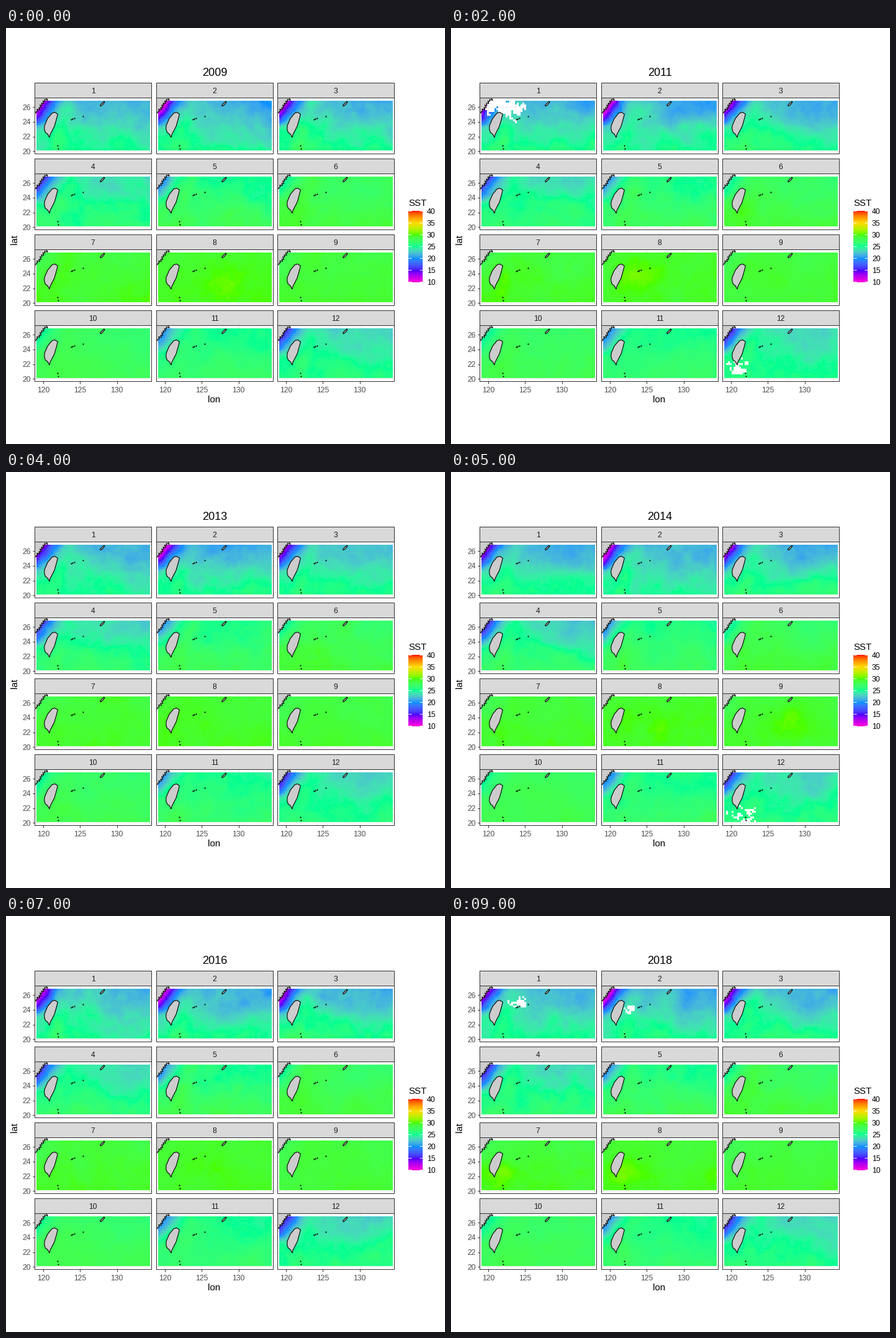
Animation, 707 px wide and 669 px high, one loop 10 s. Source, as a matplotlib script:

```python
import numpy as np
import matplotlib.pyplot as plt
from matplotlib.animation import FuncAnimation
from matplotlib.patches import Rectangle, Polygon

W, H, DPI = 707, 669, 100
PX = 72 / DPI
YEARS = range(2009, 2019)
COLS, ROWS = (46, 242, 437), (88, 210, 332, 454)
PW, STRIP, PH = 188, 24, 90
NX, NY = 61, 27
DEG = 11.86

plt.rcParams["font.family"] = "Liberation Sans"


# ---- colour scale: seven rainbow stops blended in CIELAB ----
M = np.array([[.4124, .3576, .1805], [.2126, .7152, .0722], [.0193, .1192, .9505]])
WHITE = M.sum(axis=1)


def to_lab(rgb):
    lin = np.where(rgb <= .04045, rgb / 12.92, ((rgb + .055) / 1.055) ** 2.4)
    t = lin @ M.T / WHITE
    f = np.where(t > .008856, np.cbrt(t), 7.787 * t + 16 / 116)
    return np.stack([116 * f[:, 1] - 16, 500 * (f[:, 0] - f[:, 1]),
                     200 * (f[:, 1] - f[:, 2])], axis=1)


def to_rgb(lab):
    fy = (lab[:, 0] + 16) / 116
    f = np.stack([fy + lab[:, 1] / 500, fy, fy - lab[:, 2] / 200], axis=1)
    xyz = np.where(f > .2069, f ** 3, (f - 16 / 116) / 7.787) * WHITE
    lin = np.clip(xyz @ np.linalg.inv(M).T, 0, 1)
    return np.clip(np.where(lin <= .0031308, 12.92 * lin,
                            1.055 * lin ** (1 / 2.4) - .055), 0, 1)


STOPS = ["#FF00DB", "#4900FF", "#0092FF", "#00FF92", "#49FF00", "#FFDB00", "#FF0000"]
stops = to_lab(np.array([[int(c[i:i + 2], 16) / 255 for i in (1, 3, 5)] for c in STOPS]))
pos = np.linspace(0, 6, 601)
LUT = to_rgb(np.stack([np.interp(pos, range(7), stops[:, k]) for k in range(3)], axis=1))

# ---- sea surface ----
# yearly heat wave: month, lon, lat, radius, degrees
HEAT = {2009: (8, 129, 23, 6, .6), 2011: (8, 123.8, 23.5, 3, 1.3),
        2012: (7, 127.5, 24, 3, .9), 2014: (9, 127.5, 23.3, 4.5, 1.5),
        2015: (7, 124.5, 23.3, 3, 1.5), 2017: (8.3, 128.5, 23, 8, 1.5),
        2018: (7.5, 122, 22.5, 2.5, 1.6)}
# clouded spots: year, month, lon, lat, radius
CLOUDED = [(2011, 1, 122.6, 25.8, 2.8), (2011, 12, 121, 21.8, 1.6),
           (2012, 1, 120, 25.6, 1.6), (2012, 2, 121, 25.8, 1.8),
           (2014, 12, 121.8, 21, 2.2), (2015, 12, 122, 26.4, .8),
           (2017, 11, 123.3, 26, .9), (2017, 12, 122.5, 25.8, .9),
           (2018, 1, 124, 25, 1.3), (2018, 2, 122.6, 24, .8)]

xs = 49 + (np.arange(NX) + .5) * 182.5 / NX
ys = 117.5 + (np.arange(NY) + .5) * 80 / NY
LON, LAT = np.meshgrid(120 + (xs - 60) / DEG, 20 + (198.3 - ys) / DEG)


def bump(x, y, rx, ry):
    return np.exp(-((LON - x) / rx) ** 2 - ((LAT - y) / ry) ** 2)


def season(month, mean, swing, peak):
    return mean + swing * np.cos((month - peak) * np.pi / 6)


def cloud(rng, power):
    """Smooth random field with unit spread."""
    n = 96
    f = np.fft.fftfreq(n) * n
    k = np.hypot(*np.meshgrid(f, f)) + 1.5
    z = np.fft.ifft2(np.fft.fft2(rng.normal(size=(n, n))) * k ** -power).real
    z = z[:NY, :NX]
    return (z - z.mean()) / z.std()


def sea(year, month):
    """RGBA picture of one month's surface temperature."""
    rng = np.random.default_rng(year * 100 + month)
    south = season(month, 27.4, 2.2, 7.6)
    north = season(month, 25, 4.1, 8)
    coast = season(month, 20.2, 8.9, 8)
    gap = south - north

    rise = np.clip((LAT - 20) / 6.8 + .07 * cloud(rng, 2), 0, 1.1)
    t = south - gap * rise * (.62 + .38 * (LON - 119) / 15.4)
    t += .25 * gap * np.exp(-((LON - 122.4 - .3 * (LAT - 23)) / 1.1) ** 2)
    t -= .15 * gap * bump(130, 24.8, 4, 1.5)
    t += (.15 + .06 * gap) * cloud(rng, 1.9) + .1 * cloud(rng, .9)
    if year in HEAT:
        m, x, y, r, dt = HEAT[year]
        t += dt * np.exp(-(month - m) ** 2) * bump(x, y, r, .65 * r)

    # cold water hugging the mainland
    off = (LON - 119.5) * .839 - (LAT - 26) * .545 + .12 * cloud(rng, 1.8)
    pull = np.exp(-(np.maximum(off, 0) / 1.4) ** 1.6) / (1 + np.exp((23.6 - LAT) / .4))
    t += (np.minimum(coast, t) - t) * pull

    img = np.dstack([LUT[np.clip((t - 10) * 20, 0, 600).astype(int)],
                     np.ones((NY, NX))])
    for y0, m, x, y, r in CLOUDED:
        if (y0, m) == (year, month):
            img[bump(x, y, r, .7 * r) * (1 + .8 * cloud(rng, .8)) > .65, 3] = 0
    return img


# ---- stage ----
fig = plt.figure(figsize=(W / DPI, H / DPI), dpi=DPI, facecolor="white")
ax = fig.add_axes([0, 0, 1, 1])


def text(x, y, s, size, color="black", ha="center", **kw):
    return ax.text(x, y, s, fontsize=size * PX, color=color, ha=ha,
                   va=kw.pop("va", "baseline"), zorder=9, **kw)


def line(x, y, color, lw=1., z=1):
    ax.plot(x, y, color=color, lw=lw * PX, zorder=z, solid_capstyle="butt")


def box(x, y, h, fill):
    patch = Rectangle((x, y), PW, h, fc=fill, ec="#333333", lw=PX, zorder=6)
    return ax.add_patch(patch)


def land(pts, x, y, clip):
    patch = Polygon(np.array(pts) + (x, y), fc="#CCCCCC", ec="black",
                    lw=1.1 * PX, zorder=4)
    ax.add_patch(patch)
    patch.set_clip_path(clip)


def rugged_coast():
    """Jagged shore running from the panel's top down to its left side."""
    rng = np.random.default_rng(4)
    s = np.linspace(0, 1, 20)
    jag = 2.2 * (-1) ** np.arange(20) + rng.normal(0, .8, 20)
    shore = np.stack([21 - 23 * s + .8 * jag, -1 + 30 * s + .6 * jag], axis=1)
    return [(-5, -5), (23, -5), *shore, (-5, 29)]


# outlines in pixels from a panel's corner
TAIWAN = [(32.5, 23.5), (37.3, 26.5), (35, 35.5), (32, 46), (25, 59.5), (24, 64),
          (21, 58.5), (17.5, 56), (15.8, 51), (16, 45), (21, 33.5), (28, 25)]
OKINAWA = [(105.5, 12.5), (107.5, 10), (112, 6), (113, 7), (110, 11), (106.5, 13.8)]
ISLETS = [(59, 34.5), (61, 34.3), (64, 33), (77.5, 30), (36.5, 77), (37.5, 81.5)]
MAINLAND = rugged_coast()

images = []
for k in range(12):
    x, y = COLS[k % 3], ROWS[k // 3]
    top = y + STRIP
    box(x, y, STRIP, "#D9D9D9")
    frame = box(x, top, PH, "none")
    text(x + PW / 2, y + 17, str(k + 1), 12, "#1A1A1A")
    for i in range(6):
        gx = x + 14 + 2.5 * i * DEG
        line([gx, gx], [top, top + PH], "#EBEBEB", .5 if i % 2 else 1)
    for i in range(8):
        gy = top + 86.3 - i * DEG
        line([x, x + PW], [gy, gy], "#EBEBEB", .5 if i % 2 else 1)
    images.append(ax.imshow(sea(YEARS[0], k + 1), aspect="auto", interpolation="nearest",
                            extent=(x + 3, x + 185.5, top + 85.5, top + 5.5), zorder=3))
    for pts in (TAIWAN, MAINLAND, OKINAWA):
        land(pts, x, top, frame)
    for dx, dy in ISLETS:
        ax.plot(x + dx, top + dy, "o", color="black", ms=2.2 * PX, mew=0, zorder=4)
    if k % 3 == 0:
        for lat in (20, 22, 24, 26):
            ty = top + 86.3 - (lat - 20) * DEG
            line([x - 3, x], [ty, ty], "#333333")
            text(x - 6, ty + 4.5, str(lat), 12.3, "#4D4D4D", "right")
    if k >= 9:
        for lon in (120, 125, 130):
            tx = x + 14 + (lon - 120) * DEG
            line([tx, tx], [top + PH, top + PH + 4], "#333333")
            text(tx, 585.5, str(lon), 12.3, "#4D4D4D")

title = text(336, 77.4, "", 18)
text(335, 602.4, "lon", 15)
text(14, 340, "lat", 15, rotation=90, va="center")
text(648, 285.5, "SST", 15, ha="left")
ax.imshow(LUT[::-1, None], extent=(648, 671, 409, 294), aspect="auto", zorder=3)
for i in range(7):
    ly = 408.4 - i * 19
    line([648, 652.6], [ly, ly], "white", 1, 5)
    line([666.4, 671], [ly, ly], "white", 1, 5)
    text(678, ly + 4.8, str(10 + 5 * i), 12.3, ha="left")

ax.set_xlim(0, W)
ax.set_ylim(H, 0)
ax.axis("off")


def draw(i):
    title.set_text(str(YEARS[i]))
    for k, im in enumerate(images):
        im.set_data(sea(YEARS[i], k + 1))
    return [title, *images]


anim = FuncAnimation(fig, draw, frames=len(YEARS), interval=1000, repeat=True,
                     repeat_delay=0)
plt.show()
```
